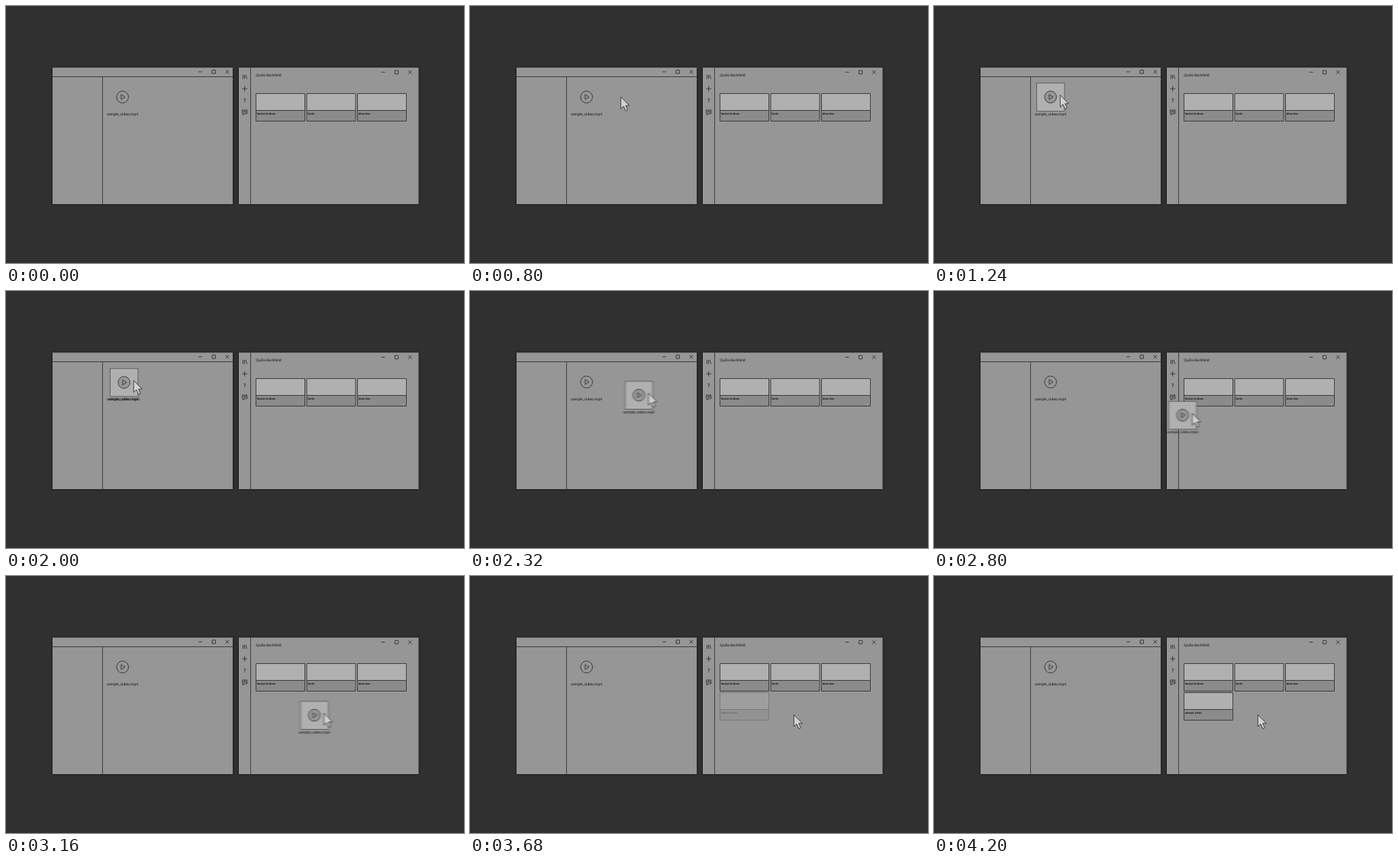
These frames come from a looping animation (600x336 px, 6000 ms). An HTML page:

```html
<!DOCTYPE html>
<html lang="en">
<head>
<meta charset="utf-8">
<title>Drag a video into the library</title>
<style>
  html, body { margin: 0; width: 100%; height: 100%; overflow: hidden; background: #303030; }
  svg { display: block; width: 600px; height: 336px; }
  text { font-family: "Noto Sans", "Open Sans", sans-serif; fill: #0c0c0c; text-rendering: geometricPrecision; }
  .window { fill: #969696; filter: drop-shadow(0 0 1.6px #000a); }
  .line { fill: none; stroke: #2c2c2c; stroke-width: .8; }
  .thin { fill: none; stroke: #1c1c1c; stroke-width: .7; }
  .file { font-size: 4.66px; font-weight: 500; }
  .title { font-size: 4.6px; font-weight: 500; }
  .name { font-size: 3.25px; font-weight: 600; }
  .arrow { fill: #d2d2d2; stroke: #333; stroke-width: .7; filter: drop-shadow(.8px .8px .7px #0008); }
</style>
</head>
<body>
<svg id="stage" viewBox="0 0 600 336"></svg>
<script>
const controls = (x, y) => `<path class="thin" d="M${x} ${y}h5m13-2.2h4.4v4.4h-4.4zm17.6 0l4.4 4.4m0-4.4l-4.4 4.4"/>`;

const card = (x, y, name) => `
  <rect x="${x}" y="${y}" width="64" height="36" fill="#8b8b8b"/>
  <rect x="${x}" y="${y}" width="64" height="22" fill="#b0b0b0"/>
  <path class="line" d="M${x} ${y}h64v36h-64zm0 22h64"/>
  <text class="name" x="${x + 1.2}" y="${y + 27}">${name}</text>`;

const icon = `
  <circle class="line" cx="152.7" cy="119" r="7.8" style="fill:#969696"/>
  <path class="line" d="M150.9 115.8v6.4l5-3.2z"/>`;

const label = `<text class="file" x="132" y="142.8">sample_video.mp4</text>`;

stage.innerHTML = `
  <filter id="blur" x="-30%" y="-30%" width="160%" height="160%" color-interpolation-filters="sRGB">
    <feGaussianBlur id="smear"/>
  </filter>
  <rect width="600" height="336" fill="#303030"/>

  <rect class="window" x="61" y="80.5" width="236" height="178.5"/>
  <path class="line" d="M61 92.5h236M126.5 92.5v166.5"/>
  ${controls(252, 86)}${icon}${label}

  <rect class="window" x="305" y="80.5" width="235.5" height="178.5"/>
  <path class="line" d="M320.5 80.5v178.5"/>
  ${controls(491.5, 86.5)}
  <path class="thin" d="M310.5 90v5.4m2-5.4v5.4m1.4-5.4l1.9 5.4M309.2 108.2h7m-3.5-3.5v7"/>
  <text x="312.7" y="126.3" font-size="7" text-anchor="middle">?</text>
  <path class="thin" d="M309.6 136h6.3v4.8h-3.4l-1.8 1.9v-1.9h-1.1z"/>
  <path class="line" d="M311 137.7h3.6m-3.6 1.3h3.6"/>
  <text class="title" x="327.2" y="92.2">Quilla Backfield</text>
  ${card(327.5, 114.5, "Rocket &amp; Moon")}
  ${card(394, 114.5, "Earth")}
  ${card(460.5, 114.5, "Moss Hen")}
  <g id="added">${card(327.5, 152.5, "sample_video")}</g>

  <g id="parcel">
    <rect x="134.6" y="100.8" width="36.4" height="36.6" fill="#b0b0b0" stroke="#555" stroke-width=".8"/>
    ${icon}<g id="tag">${label}</g>
  </g>
  <g id="cursor">
    <path class="arrow" d="M.4 .5V15.8L4 12.6 6.7 18.6 9.2 17.5 6.6 11.7H11.3z"/>
  </g>`;

const $ = id => document.getElementById(id);
const [added, parcel, tag, cursor, smear] = ["added", "parcel", "tag", "cursor", "smear"].map($);
const clamp = u => Math.min(1, Math.max(0, u));
const smooth = u => u * u * (3 - 2 * u);

// Constant speed with a short ramp at each end
function glide(u, ramp = .07) {
  u = clamp(u);
  if (u > .5) return 1 - glide(1 - u, ramp);
  return (u < ramp ? u * u / (2 * ramp) : u - ramp / 2) / (1 - ramp);
}

function pose(t) {
  const reach = glide((t - 680) / 560), drag = glide((t - 1960) / 1280);
  return { reach, drag, x: 205 - 40 * reach + 259 * drag, y: 119 - 3 * reach + 65 * drag };
}

const show = (el, on) => el.setAttribute("visibility", on ? "inherit" : "hidden");
const blurIf = (el, on) => el.setAttribute("filter", on ? "url(#blur)" : "none");
const move = (el, x, y) => el.setAttribute("transform", `translate(${x} ${y})`);

function draw(t) {
  const { reach, drag, x, y } = pose(t);
  const a = pose(t - 10), b = pose(t + 10);
  const dragging = drag > 0 && drag < 1;
  const spread = d => Math.abs(d) / Math.sqrt(12);
  smear.setAttribute("stdDeviation", `${spread(b.x - a.x)} ${spread(b.y - a.y)}`);

  show(cursor, t >= 400);
  move(cursor, x, y);
  blurIf(cursor, dragging || (reach > 0 && reach < 1));

  show(parcel, t < 3360 && (drag > 0 || x < 172));
  show(tag, drag > 0);
  if (t >= 3360) show(tag, false);
  move(parcel, 259 * drag, 65 * drag);
  blurIf(parcel, dragging);

  added.setAttribute("opacity", smooth(clamp((t - 3360) / 840)));
}

const start = performance.now();
function tick() {
  const t = (performance.now() - start) % 6000;
  draw(Math.floor(t / 40) * 40); // 25 steps a second
  requestAnimationFrame(tick);
}
tick();
</script>
</body>
</html>
```
